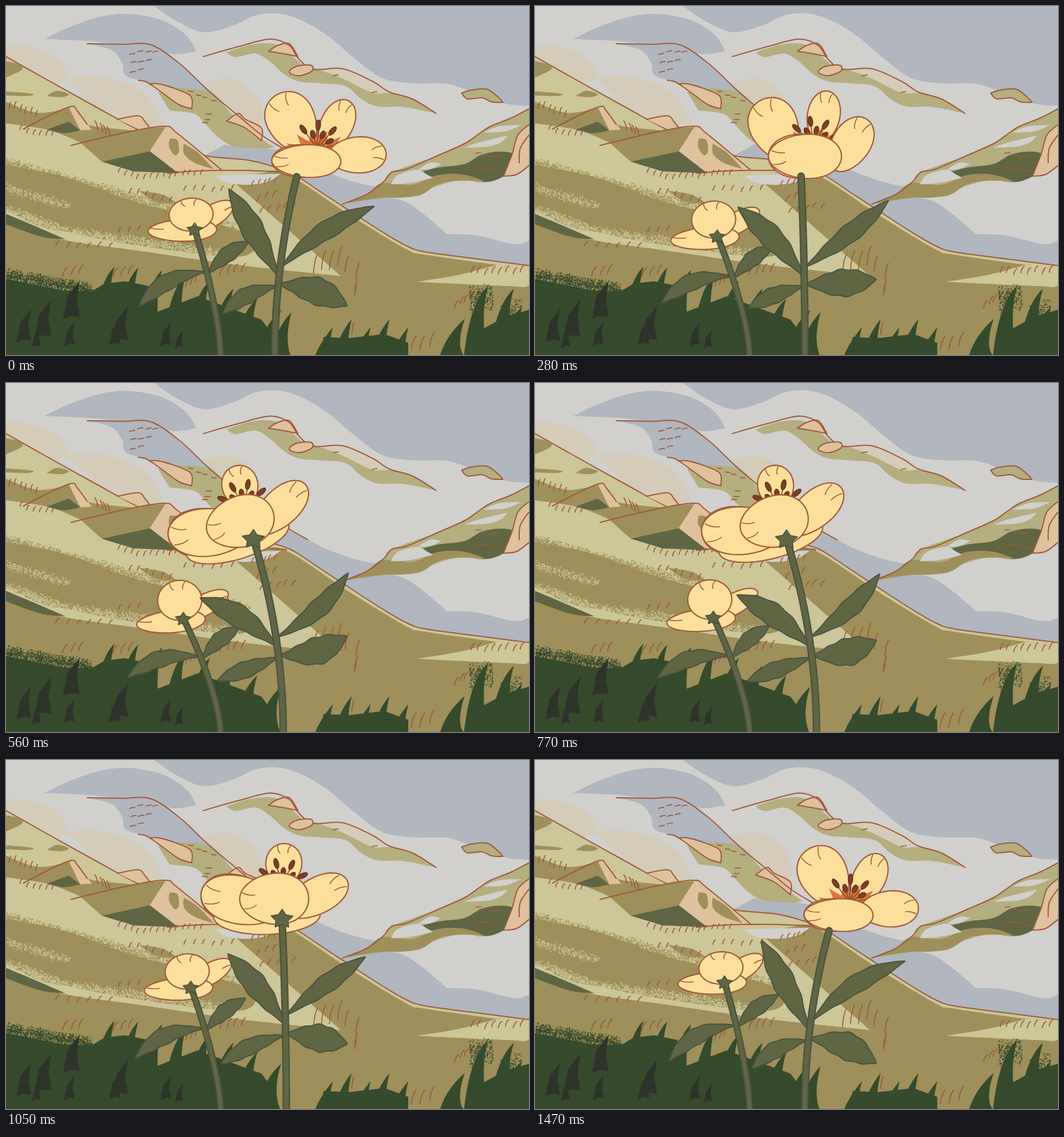
Write an HTML page with a canvas that moves like this. It is 901 px wide and 601 px high and loops after 1.54 s.

```html
<!DOCTYPE html>
<html lang="en">
<head>
<meta charset="utf-8">
<title>Meadow flower</title>
<style>
html, body { margin: 0; width: 100%; height: 100%; overflow: hidden; }
canvas { display: block; width: 901px; height: 601px; }
</style>
</head>
<body>
<canvas id="stage" width="901" height="601"></canvas>
<script>
const SKY = '#b1b6bf', CLOUD = '#d1d0cd', HAZE = '#d4ccb9', LIGHT = '#cdc699', OLIVE = '#9f8f5a',
  SAGE = '#b5ae7f', MOSS = '#606544', EDGE = '#4b523f', GRASS = '#364a2c', DARK = '#2e3429',
  LINE = '#a0593a', PEACH = '#e0c19d', PETAL = '#fddf9b', FLAME = '#dc7440', STAMEN = '#7c4022';

const stage = document.getElementById('stage').getContext('2d');
const scenery = document.createElement('canvas');
scenery.width = 901;
scenery.height = 601;
let c = scenery.getContext('2d');

const { PI, sin, cos, min, max } = Math;
const lerp = (a, b, k) => a + (b - a) * k;
const mixPoints = (p, q, k) => p.map((v, i) => lerp(v, q[i], k));
const clamp = v => min(1, max(0, v));
const range = (n, f) => Array.from({ length: n }, (_, i) => f(i));

let seed = 7;
const random = () => (seed = (seed * 16807) % 2147483647) / 2147483647;

// A trailing "!" doubles a point, which makes it a corner of the curve.
function points(text) {
  return text.trim().split(/\s+/).flatMap(token => {
    const p = token.replace('!', '').split(',').map(Number);
    return token.endsWith('!') ? [p, p] : [p];
  });
}

function trace(p, closed) {
  const n = p.length;
  const get = i => closed ? p[(i + n) % n] : p[max(0, min(n - 1, i))];
  c.beginPath();
  c.moveTo(...p[0]);
  for (let i = 0; i < (closed ? n : n - 1); i++) {
    const [a, b, d, e] = [get(i - 1), get(i), get(i + 1), get(i + 2)];
    if (b[0] === d[0] && b[1] === d[1]) continue;
    c.bezierCurveTo(b[0] + (d[0] - a[0]) / 6, b[1] + (d[1] - a[1]) / 6,
      d[0] - (e[0] - b[0]) / 6, d[1] - (e[1] - b[1]) / 6, ...d);
  }
  if (closed) c.closePath();
}

function ink(color, width) {
  c.strokeStyle = color;
  c.lineWidth = width;
  c.lineJoin = c.lineCap = 'round';
  c.stroke();
}

function shape(color, text, outline) {
  trace(points(text), true);
  c.fillStyle = color;
  c.fill();
  if (outline) ink(outline, 2);
}

function line(text, width = 2) {
  trace(points(text));
  ink(LINE, width);
}

function polygon(color, p, outline, width = 2) {
  c.beginPath();
  p.forEach(q => c.lineTo(...q));
  c.closePath();
  c.fillStyle = color;
  c.fill();
  if (outline) ink(outline, width);
}

function ticks(x, y, count, dx, dy, lx = -4, ly = 8) {
  for (let i = 0; i < count; i++) {
    const px = x + i * dx + random() * 3, py = y + i * dy + random() * 5 - 2;
    c.beginPath();
    c.moveTo(px, py);
    c.quadraticCurveTo(px + lx * .8, py + ly * .3, px + lx, py + ly);
    ink(LINE, 1.7);
  }
}

function speckle(color, x0, y0, x1, y1, spread, count) {
  c.fillStyle = color;
  for (let i = 0; i < count; i++) {
    const k = random(), off = (random() + random() - 1) * spread, size = 1 + random();
    c.fillRect(lerp(x0, x1, k), lerp(y0, y1, k) + off, size, size);
  }
}

function paintSky() {
  c.fillStyle = CLOUD;
  c.fillRect(0, 0, 901, 601);
  shape(SKY, '255,0! 292,25 340,45 390,34 430,16 470,13 510,25 555,52 600,90 648,124 700,133 760,134 805,149 860,168 901,172! 901,0!');
  shape(SKY, '66,57! 110,36 165,18 215,14 270,25 310,50 328,78! 290,83 260,75 200,66 140,60');
  shape(SKY, '140,65! 250,66 300,102! 375,165! 345,150 290,145 250,133 207,120 200,98 182,76');
  shape(HAZE, '0,67! 45,71 82,86 100,105 108,123! 60,150! 0,120!');
  shape(HAZE, '104,125! 150,121 200,131 240,152 263,185 268,207 230,215! 150,168!');
  shape(HAZE, '338,132! 380,125 412,138 435,165 442,192 430,212! 385,175!');

  shape(HAZE, '530,109! 580,108 625,126 655,148 620,150 575,125');
  shape(SAGE, '380,80! 420,67 460,65 485,80 512,103! 540,110 580,125 630,149 660,150 700,159 741,185! 685,174 640,173 612,160 585,138 540,133 505,130 480,118 455,96 430,82 396,88');
  shape(PEACH, '452,78! 468,68 488,65 503,87! 478,82', LINE);
  line('340,87 400,70 455,57 488,68 505,92 530,109 580,108 632,130 660,148 700,160 741,185');
  shape(PEACH, '488,114 500,104 525,102 527,112 505,120', LINE);
  shape(SAGE, '785,150! 800,145 828,143 848,157 856,166! 836,165 820,158 795,160', LINE);
}

function paintDistance() {
  shape(SAGE, '262,148! 300,142 340,145 362,155! 385,182! 440,228 462,243! 430,248 395,243 368,228 345,205 325,186 282,180!');
  shape(SKY, '345,256! 378,238! 400,243 460,247 500,259 550,285 600,303 640,312! 580,345! 480,290!');
  shape(SKY, '570,340! 640,331 680,334 715,355 760,393! 810,395 875,410 901,404! 901,450! 700,420!');
  shape(PEACH, '248,134! 262,134 285,140 318,155 320,177! 298,170 270,150', LINE);
  shape(PEACH, '380,198! 400,185 412,195 440,210 440,232! 412,210', LINE);
  line('140,65 200,66 250,67 300,100 350,147 400,189 440,222 480,247 520,270');
  line('228,128 240,130 252,137');
  for (let row = 0; row < 3; row++) ticks(222, 79 + row * 16, 4 - row, 13, -1, -9, 2);
  ticks(320, 147, 4, 13, 5, -8, -1);
  ticks(352, 185, 3, -3, 8, -9, 0);
  ticks(570, 119, 2, 69, 29, -9, 2);

  shape(SAGE, '901,177! 870,193 835,207 790,237 745,257 665,286 650,303 620,325 580,341! 700,322 780,300 830,303 901,275!');
  shape(MOSS, '708,288! 745,278 790,272 822,255 860,251 901,262! 858,293 825,303 785,292 740,296');
  shape(OLIVE, '580,341! 620,325 648,305 700,308 740,292 775,289 800,293 825,302! 780,301 745,307 715,325 680,330 640,331');
  shape(CLOUD, '663,307! 675,291 708,282 725,290 736,296! 695,305');
  shape(CLOUD, '789,244! 815,235 865,223! 852,235 830,242');
  shape(CLOUD, '822,218! 850,207 888,205! 860,216');
  shape(CLOUD, '710,282! 730,270 750,272! 730,281');
  shape(PEACH, '903,203! 882,222 872,255 857,293! 880,290 903,273!', LINE);
  line('901,222 886,245 884,270');
  line('901,177 870,193 835,207 815,220 790,237 745,257 690,281 665,286 650,303 620,325 580,341');
  for (const y of [253, 278]) ticks(817, y, 4, 11, 2, -9, 1);
}

function paintHills() {
  const ridge = ' 60,121 150,171 230,214 300,240 345,258 420,266 475,281 500,292 545,322 600,358 650,390 690,413 720,423 800,434 ';
  shape(LIGHT, '0,87!' + ridge + '901,447! 901,601! 0,601!');
  line('0,87' + ridge + '901,447');
  shape(OLIVE, '388,299! 440,288 485,290 600,365 690,419 720,428 840,445! 901,452! 901,601! 0,601! 0,376! 100,403 225,421 400,446 577,465!');
  shape(LIGHT, '707,475! 780,463 845,446! 901,449! 901,481 860,482');
  shape(OLIVE, '0,95! 24,101 27,110 0,123!');
  shape(OLIVE, '0,147! 45,151 38,155 0,154!');
  shape(OLIVE, '70,155! 88,146 108,152 95,157');
  shape(OLIVE, '0,165! 55,184 110,175! 140,204 215,214! 200,232 135,238! 75,214 0,202!');
  shape(MOSS, '70,213! 108,199! 128,214! 100,219');
  shape(PEACH, '109,176! 122,180 148,213! 128,214!');
  line('30,212 70,191 112,173 123,181 140,204');
  shape(PEACH, '194,196! 228,190 250,214! 232,214!');
  line('192,195 228,189 240,200 250,213');
  shape(OLIVE, '130,237! 200,217 275,208! 248,250! 165,268!');
  shape(MOSS, '165,268! 248,250! 297,288! 220,285!');
  shape(PEACH, '275,208! 290,213 375,285! 298,288! 248,250!');
  shape(OLIVE, '282,228! 295,231 298,250 291,257 281,243');
  shape(OLIVE, '306,237! 330,252 358,281! 325,270 307,255');
  line('112,240 200,219 272,207 296,220 372,283');
  line('278,288 330,284 400,283 475,286 482,288');
  shape(CLOUD, '360,292! 420,290 473,289! 450,303 412,308 378,303');

  shape(OLIVE, '0,274! 100,294 200,330 270,350 330,365 420,395 428,420 400,432 340,428 200,408 110,390 60,380 0,352!');
  shape(OLIVE, '228,318! 270,325 295,340! 260,338');
  speckle(OLIVE, 0, 273, 180, 322, 14, 1500);
  speckle(OLIVE, 180, 322, 420, 395, 16, 1500);
  speckle(LIGHT, 0, 352, 110, 392, 13, 700);
  speckle(LIGHT, 110, 390, 400, 432, 13, 1500);
  speckle(LIGHT, 0, 312, 110, 345, 10, 300);
  shape(MOSS, '0,358! 50,379 103,402! 60,397 0,376!');

  ticks(8, 163, 6, 9, 3, -3, 11);
  ticks(28, 206, 6, 11, 2);
  ticks(152, 197, 4, 7, 3, 5, 15);
  ticks(197, 278, 4, 10, 3);
  ticks(240, 290, 10, 11, -1);
  ticks(426, 298, 5, 10, -1);
  ticks(214, 313, 6, 14, 3);
  ticks(310, 309, 6, 16, 0);
  ticks(438, 325, 3, 13, -4, -6, 10);
  ticks(442, 345, 5, 14, -2, -6, 9);
  ticks(196, 380, 3, 17, -1);
  ticks(91, 404, 6, 18, 1, -6, 8);
  for (const x of [104, 190]) ticks(x, 449, 3, 14, -1, -8, 15);
  ticks(315, 467, 3, 8, -3, -8, 15);
  ticks(375, 448, 4, 12, -2, -7, 14);
  ticks(534, 427, 4, 14, -4, -7, 32);
  ticks(589, 429, 2, 17, 15, -6, 27);
  ticks(605, 469, 2, -2, 9, -3, 20);
  ticks(805, 449, 8, 12, 0, -6, 11);
  ticks(778, 507, 5, 9, -5, -7, 13);
  ticks(706, 570, 3, 15, -4, -8, 24);
  ticks(599, 543, 2, 56, 9, -4, 20);
  ticks(457, 542, 2, 8, -13, -9, 22);
}

function blade(x, y, lean = 40) {
  c.beginPath();
  c.moveTo(x, y);
  c.quadraticCurveTo(x - lean * .75, y + 28, x - lean, 601);
  c.lineTo(x - 2, 601);
  c.quadraticCurveTo(x - lean * .35, y + 45, x, y);
  c.fillStyle = GRASS;
  c.fill();
}

function paintGrass() {
  polygon(GRASS, points('0,470 100,490 148,491 170,478 205,474 245,482 252,530 330,500 440,540 455,560 441,601 0,601'));
  for (let i = 0; i < 8; i++) blade(187 + i * 41, 449 + 74 * (i / 7) ** 2, 42);
  polygon(GRASS, points('543,601 547,570 590,572 652,565 693,580 693,601'));
  for (let i = 0; i < 5; i++) blade(563 + i * 32.5, 546 + 7 * cos(i * PI), 30);
  polygon(GRASS, points('793,601 796,570 860,535 901,523 901,601'));
  for (const [x, y] of points('790,539 831,482 875,487 889,518')) blade(x, y, 42);
  speckle(GRASS, 0, 464, 148, 489, 14, 1300);
  speckle(GRASS, 798, 505, 838, 502, 25, 300);
  speckle(GRASS, 850, 540, 888, 525, 30, 350);
  for (const [x, y] of points('43,522 78,506 60,553 127,473 118,544 197,540 210,517 284,545 305,558')) {
    const h = 30 + 35 * clamp((560 - y) / 50), w = h * .4;
    polygon(DARK, [[x, y], [x - w * .8, y + h * .4], [x - w * 1.1, y + h], [x - w * .5, y + h - 4], [x, y + h - 2], [x - w * .2, y + h * .5]]);
  }
}

// State of the wind at the current step: sway runs -1..1, open runs from back view 0 to front view 1.
let sway = 0, open = 1;

// A stem bends away from its root by a power of its height.
function makeStem(root, head, power) {
  return u => [lerp(root[0], head[0], u ** power), lerp(root[1], head[1], u)];
}

function drawStem(stem, width) {
  trace(range(9, i => stem(i / 8)));
  ink(EDGE, width + 2.5);
  ink(MOSS, width - 2);
}

// A leaf follows a bowed midrib; its half width swells along it with a slight wave.
function drawLeaf(base, tip, width, bend) {
  const dx = tip[0] - base[0], dy = tip[1] - base[1], length = Math.hypot(dx, dy);
  const side = (k, sign) => {
    const bow = 4 * bend * k * (1 - k) +
      sign * width / 2 / length * sin(PI * k ** 1.2) ** .9 * (1 + .06 * sin(k * 26 + sign));
    return [base[0] + dx * k + dy * bow, base[1] + dy * k - dx * bow];
  };
  const n = 36;
  polygon(MOSS, [...range(n + 1, i => side(i / n, 1)), ...range(n + 1, i => side(1 - i / n, -1))], EDGE);
}

// A petal is an egg from base to tip, fuller at the tip when taper is positive.
function drawPetal([bx, by, tx, ty, width], taper = 0, creases = 2) {
  const dx = tx - bx, dy = ty - by, length = Math.hypot(dx, dy);
  const at = (angle, r = 1) => {
    const k = .5 - .5 * r * cos(angle);
    const across = r * width / 2 / length * sin(angle) * (1 + taper * (k - .5));
    return [bx + dx * k - dy * across, by + dy * k + dx * across];
  };
  polygon(PETAL, range(48, i => at(i * PI / 24)), LINE, 2.2);
  for (let i = 0; i < creases; i++) {
    const angle = PI + .75 * (i - .4);
    c.beginPath();
    c.moveTo(...at(angle, .95));
    c.quadraticCurveTo(...at(angle + .12, .75), ...at(angle, .58));
    ink(LINE, 1.6);
  }
}

function drawCalyx(x, y, size) {
  polygon(MOSS, range(10, i => {
    const r = size * (i % 2 ? .55 : 1), a = i * PI / 5 - .3;
    return [x + r * cos(a), y + r * .85 * sin(a)];
  }), EDGE, 1.6);
}

function drawSmallPlant() {
  const head = [316 + 11 * sway, 393 - 12 * sway], stem = makeStem([370, 603], head, 1.5);
  drawLeaf(stem(.66), [220 + 11 * sway, 513 + 6 * sway], 28, -.12);
  drawLeaf(stem(.64), [411 + 9 * sway, 412 - 8 * sway], 26, .06);
  c.save();
  c.translate(...head);
  drawPetal([-5, 0, 71 - 6 * sway, -44, 36], 0, 1);
  drawPetal([38, 1, -80, 8 - 4 * sway, 38], -.2, 1);
  drawPetal([-4, 4, -8, -58 + 7 * sway, 76], 0, 2);
  c.restore();
  drawStem(stem, 9);
  drawCalyx(head[0], head[1] + 2, 14);
}

// Each part of the blossom has three views: back, half open, front.
const view = (back, half, front) =>
  open < .5 ? mixPoints(back, half, open * 2) : mixPoints(half, front, open * 2 - 1);

function drawStamens([x, y]) {
  const reach = min(1, open * 2);
  polygon(FLAME, range(17, i => {
    const a = PI * 1.02 + i * PI / 14, r = reach * (i % 2 ? .6 : 1);
    return [x + 61 * r * cos(a), y + 14 + 46 * r * sin(a)];
  }));
  for (let i = 0; i < 7; i++) {
    const long = i % 2 === 0, a = -2.2 - .3 * (1 - open) + i * .34, r = long ? 40 : 25;
    const tip = [x + r * cos(a), y + r * sin(a)];
    c.beginPath();
    c.moveTo(x, y);
    c.lineTo(...tip);
    ink(STAMEN, 1.5);
    c.beginPath();
    c.ellipse(...tip, long ? 9 : 7, 4, a, 0, 2 * PI);
    c.fillStyle = STAMEN;
    c.fill();
    ink('#5a2e1c', 1.3);
  }
}

function drawBlossom(x, y) {
  const front = view([46, -37, -73, -35, 88], [70, -13, -56, -17, 76], [76, -7, -43, -9, 56]);
  c.save();
  c.translate(x, y);
  c.rotate(.28 * min(sway, 0) * (1 - open));
  drawPetal(view([0, -18, -139, -48, 82], [-23, -10, -63, -115, 82], [19, -23, -33, -123, 82]), .4);
  drawPetal(view([0, -60, 6, -131, 62], [32, -40, 50, -126, 56], [49, -30, 89, -112, 56]), .1);
  drawStamens(view([0, -58], [22, -35], [35, -30]));
  drawPetal(view([66, -10, -118, -5, 66], front, front), 0, 0);
  drawPetal(view([0, -18, -139, -48, 82], front, front), .2, open < .5 ? 2 : 0);
  drawPetal(view([5, -12, 112, -68, 62], [57, 10, 115, -76, 66], [54, -17, 154, -20, 62]), .2);
  drawPetal(front, -.2);
  c.restore();
}

function drawMainPlant(t) {
  const head = [467 + 42 * sway, 272 + 5 * min(sway, 0) + 22 * min(1, open * 2)];
  const root = [474 - 12 * cos(2 * PI * (t - 100) / LOOP), 603];
  const stem = makeStem(root, head, 2);
  if (root[0] < 471) blade(492, 527, 36);
  drawLeaf(stem(.44), [root[0] - 108 + 36 * sway, 340 - 31 * sway], 38, -.03 + .03 * sway);
  drawLeaf(stem(.49), [614 + 25 * sway, 337 + 10 * sway], 31, .07 * sway);
  drawLeaf(stem(.39), [369 + 5 * sway, 522 + 10 * sway], 28, -.05 * (1 + sway));
  drawLeaf(stem(.4), [588, 480 + 45 * sway], 46, .09 * sway);
  drawBlossom(head[0], 275 + 5 * min(sway, 0));
  drawStem(stem, 10.5);
  if (open < .4) drawCalyx(head[0], head[1] + 2, 20 * (1 - open));
}

const STEP = 70, LOOP = 1540;
let shown = -1;

function frame(time) {
  const t = Math.floor(time % LOOP / STEP) * STEP;
  if (t !== shown) {
    shown = t;
    sway = cos(2 * PI * (t + 155) / LOOP);
    open = t < 560 ? 1 - t / 560 : clamp((t - 1050) / 210);
    c.drawImage(scenery, 0, 0);
    drawSmallPlant();
    drawMainPlant(t);
  }
  requestAnimationFrame(() => frame(performance.now() - start));
}

paintSky();
paintDistance();
paintHills();
paintGrass();
c = stage;
const start = performance.now();
frame(0);
</script>
</body>
</html>
```
